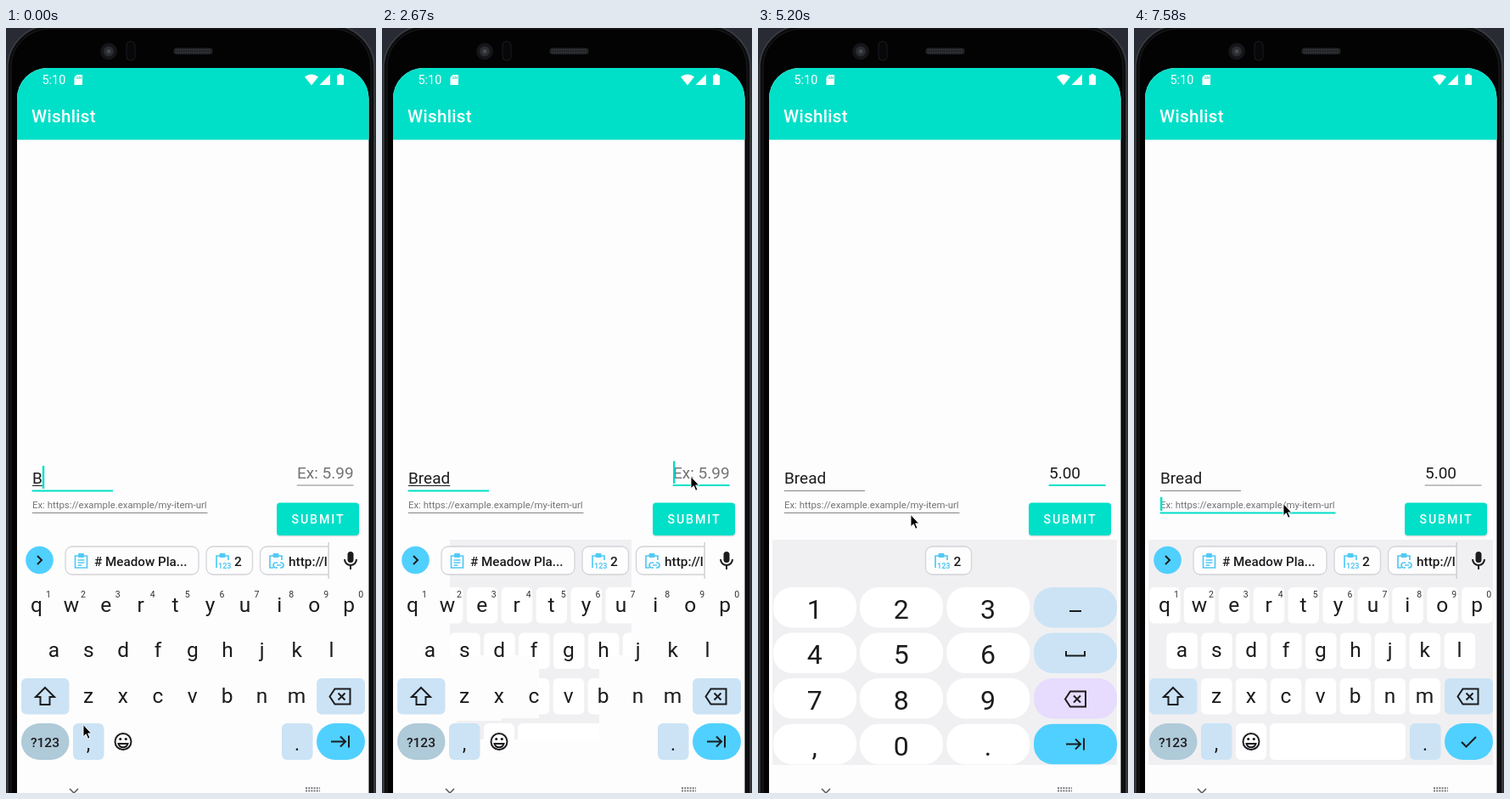
Animation of 436x900 px, one loop 8000 ms. Source, as an HTML page:

```html
<!DOCTYPE html>
<html lang="en">
<head>
<meta charset="utf-8">
<title>Wishlist entry</title>
<style>
  html, body { margin: 0; width: 100%; height: 100%; overflow: hidden; background: #25282f; }
  svg { display: block; width: 436px; height: 900px; }
  text { font-family: Roboto, sans-serif; white-space: pre; }
  .line { fill: none; stroke: #1c1c1f; stroke-width: 2; }
  .blue { fill: none; stroke: #52c9f5; stroke-width: 1.7; }
  .chip { fill: #fdfdfd; stroke: #d3d4d8; stroke-width: 1.3; }
</style>
</head>
<body>
<svg id="stage" viewBox="0 0 436 900"></svg>
<script>
const LOOP = 8000;
const TEAL = '#00dfc8', SKY = '#50d0ff', PALE = '#cbe3f5', INK = '#1c1c1f', PAPER = '#fdfdfd';

const rect = (x, y, w, h, fill, r = 0, extra = '') =>
  `<rect x="${x}" y="${y}" width="${w}" height="${h}" rx="${r}" fill="${fill}" ${extra}/>`;
const path = (d, cls = 'line', extra = '') => `<path d="${d}" class="${cls}" ${extra}/>`;
const text = (x, y, str, size, fill = INK, extra = '') =>
  `<text x="${x}" y="${y}" font-size="${size}" fill="${fill}" ${extra}>${str}</text>`;
const mid = (x, y, str, size, fill = INK, extra = '') =>
  text(x, y, str, size, fill, `text-anchor="middle" ${extra}`);
const at = (x, y, body, extra = '') => `<g transform="translate(${x} ${y})" ${extra}>${body}</g>`;
const group = (id, body) => `<g id="${id}">${body}</g>`;

// Icons are drawn around their own centre.
const tabIcon = path('M-11 0H5M0-6L6 0L0 6M10-7V7');
const eraseIcon = path('M-12 0L-6-9H12V9H-6Z') + path('M-2-4L6 4M6-4L-2 4');
const clipIcon = path('M-3-6H-7V8H7V-6H3', 'blue') + rect(-3.5, -9, 7, 5, '#52c9f5', 1);
const listIcon = clipIcon + path('M-4-1H4M-4 2H4M-4 5H1', 'blue');
const digitsIcon = path('M-3-6H-7V8M3-6H7V-1', 'blue') + rect(-3.5, -9, 7, 5, '#52c9f5', 1) +
  text(-5, 9, '123', 9, '#52c9f5', 'font-weight="700"');
const linkIcon = path('M-3-6H-7V8H-3M3-6H7V-1', 'blue') + rect(-3.5, -9, 7, 5, '#52c9f5', 1) +
  path('M2 2H0A3 3 0 0 0 0 8H2M5 2H6A3 3 0 0 1 6 8H5M1 5H6', 'blue');

// Keyboard layout
const PITCH = 40.9;
const rows = [
  { keys: 'qwertyuiop', x: 36, y: 658, base: 687 },
  { keys: 'asdfghjkl', x: 56.4, y: 711.5, base: 740 },
  { keys: 'zxcvbnm', x: 97, y: 765, base: 794 },
];
const eachKey = draw => rows.map(row =>
  [...row.keys].map((key, i) => draw(key, row.x + i * PITCH, row, i)).join('')).join('');

const relief = rect(17, 602, 406, 265, '#f0f0f2') +
  eachKey((key, x, row) => rect(x - 18, row.y, 36.5, 42.5, '#fff', 6)) +
  rect(120, 818, 36, 43, '#fff', 6) + rect(160, 818, 160, 43, '#fff', 6);

const suggestions =
  `<circle cx="39.5" cy="626" r="16.3" fill="${SKY}"/>` + path('M37 621L42 626L37 631') +
  rect(70, 610, 157, 33, PAPER, 8, 'class="chip"') + at(88.5, 627, listIcon) +
  text(104, 633, '# Meadow Pla...', 15.2, INK, 'font-weight="500"') +
  rect(236, 610, 54.5, 33, PAPER, 8, 'class="chip"') + at(255, 627, digitsIcon) +
  text(269, 633, '2', 15.5, INK, 'font-weight="500"') +
  `<g clip-path="url(#strip)">` + rect(299.5, 610, 110, 33, PAPER, 8, 'class="chip"') +
  at(318, 627, linkIcon) + text(333, 633, 'http://l', 15.4, INK, 'font-weight="500"') + '</g>' +
  rect(379.5, 605, 1.2, 43, '#c4c5c8') +
  rect(402.5, 616, 7, 13, INK, 3.5) + path('M399 625A7 7 0 0 0 413 625M406 632V637');

const letters = eachKey((key, x, row, i) => mid(x, row.base, key, 24.5) +
    (row === rows[0] ? mid(x + 14, 670, (i + 1) % 10, 10.5, '#333') : '')) +
  rect(18, 765, 56.5, 42.5, PALE, 6) + rect(366, 765, 57, 42.5, PALE, 6) +
  path('M46 776L57 787H51.5V796H40.5V787H35Z') + at(393.5, 786.5, eraseIcon) +
  rect(18, 818, 56.5, 43, '#afcad8', 21.5) + mid(46, 846, '?123', 15.5, INK, 'font-weight="500"') +
  rect(79, 818, 36.5, 43, PALE, 6) + mid(97, 850, ',', 23) +
  rect(325, 818, 36.5, 43, PALE, 6) + mid(343, 850, '.', 23) +
  '<circle cx="138" cy="839.5" r="9.5" class="line"/>' + path('M132.5 842A5.7 5.7 0 0 0 143.5 842Z') +
  `<circle cx="134.7" cy="836.5" r="1.6" fill="${INK}"/><circle cx="141.3" cy="836.5" r="1.6" fill="${INK}"/>` +
  rect(366, 818, 57, 43, SKY, 21.5) +
  group('tab', at(394, 839.5, tabIcon)) + group('check', path('M386 840L391.5 845.5L403 834'));

const padColumns = [18, 120, 222.3, 325];
const padRows = [658, 711.5, 765, 818.7];
const padFill = (r, c) => c < 3 ? '#fff' : [PALE, PALE, '#e7dcfd', SKY][r];
const pad = rect(17, 602, 406, 265, '#f0f0f2') +
  rect(197.5, 610, 54, 33, '#fff', 8, 'class="chip"') + at(216, 627, digitsIcon) +
  text(230.5, 633, '2', 15.5, INK, 'font-weight="500"') +
  ['123', '456', '789', ',0.'].map((digits, r) => padColumns.map((x, c) =>
    rect(x, padRows[r], 98, 47.5, padFill(r, c), 22) +
    (c < 3 ? mid(x + 48.7, padRows[r] + 36.8, digits[c], 32) : '')).join('')).join('') +
  path('M367 686H381') + path('M363 733V738.5H385V733') +
  at(374, 789.5, eraseIcon) + at(374, 842.5, tabIcon);

// Parts of the key backgrounds uncovered over time: start, left, top, right, bottom
const reveals = [
  [1330, 88, 815, 152, 837],
  [1480, 141, 812, 195, 837],
  [1630, 185, 720, 256, 837],
  [1770, 80, 515, 294, 738],
  [5780, 17, 602, 423, 867],
];

const fields = {
  name: { x: 31, base: 536, size: 19, right: 126, rule: 544.5, top: 515, tall: 27, hint: '' },
  price: { x: 343, base: 530, size: 19, right: 409.5, rule: 538, top: 509.5, tall: 26.5, hint: 'Ex: 5.99' },
  url: { x: 31, base: 564.5, size: 11.4, right: 237.5, rule: 570.5, top: 552, tall: 16,
         hint: 'Ex: https://example.example/my-item-url' },
};
const fieldArt = Object.entries(fields).map(([id, f]) =>
  text(f.x, f.base, '', f.size, INK, `id="${id}"`) +
  `<path id="${id}Rule" d="M${f.x - .3} ${f.rule}H${f.right}"/>`).join('');

const statusBar = text(42.5, 66, '5:10', 14.4, '#fff') +
  path('M83.5 55H90V67H80.5V58Z', '', 'fill="#fff"') + path('M84 57V60M86.3 57V60M88.4 57V60', '', `stroke="${TEAL}"`) +
  path('M352 57.5Q360 51.5 368 57.5L360 67.5Z', '', 'fill="#fff"') +
  path('M382 54.5V67H369.5Z', '', 'fill="#fff"') +
  rect(390, 55.5, 8, 11.5, '#fff', 1) + rect(392.3, 54, 3.4, 2, '#fff');

const shell = rect(0, 0, 436, 900, '#282b34') +
  rect(2, -3, 432, 1000, '#0b0c0e', 50, 'stroke="#3c3e42" stroke-width="1.6"') +
  rect(6, 1, 424, 1000, '#030304', 45, 'stroke="#1b1c1e"') +
  '<circle cx="121" cy="27.5" r="10" fill="#141518"/><circle cx="121" cy="27.5" r="6" fill="#2b2d31"/>' +
  '<circle cx="121" cy="27.5" r="2.5" fill="#45484d"/>' +
  rect(142, 16, 10, 22, '#08080a', 4, 'stroke="#1b1b1e"') +
  rect(197.5, 23.5, 46, 7.5, '#222326', 3.5) +
  path('M200 25.7H241M200 28.7H241', '', 'stroke="#4a4b4f" stroke-dasharray="1.2 1.4"');

const stage = document.getElementById('stage');
stage.innerHTML = `<defs>
    <clipPath id="screen">${rect(13, 47, 414.5, 1000, '#000', 36)}</clipPath>
    <clipPath id="strip">${rect(290, 600, 89.5, 50, '#000')}</clipPath>
    <clipPath id="uncovered">${reveals.map(([, l, t, r, b]) => rect(l, t, r - l, b - t, '#000')).join('')}</clipPath>
  </defs>` + shell +
  '<g clip-path="url(#screen)">' +
    rect(13, 47, 415, 853, PAPER) + rect(13, 47, 415, 84.5, TEAL) + statusBar +
    text(30, 110.5, 'Wishlist', 20.6, '#fff', 'font-weight="500" letter-spacing=".3"') +
    rect(319, 559.5, 97, 39, '#000', 4, 'opacity=".12"') + rect(319, 558.5, 97, 38.5, TEAL, 4) +
    text(336.5, 583.3, 'SUBMIT', 14.2, '#fff', 'font-weight="500" letter-spacing="1.9"') +
    fieldArt + path('', '', `id="spell" stroke="${INK}"`) + rect(0, 0, 2.4, 0, TEAL, 0, 'id="caret"') +
    group('letters', `<g clip-path="url(#uncovered)">${relief}</g>` + suggestions + letters) +
    group('pad', pad) +
    path('M75 895L80 900L85 895', 'line', 'style="stroke:#55565a;stroke-width:1.5"') +
    path('M353 894.3H370M353 897.5H370', '', 'stroke="#77787c" stroke-width="2" stroke-dasharray="2 1.2"') +
  '</g>' +
  group('mouse', path('M0 0V14.2L3.3 11.2L5.7 16.8L8 15.8L5.6 10.4H9.6Z', '',
    'fill="#000" stroke="#fff" stroke-width=".9"'));

const $ = id => document.getElementById(id);
const uncovered = $('uncovered').children;

// Each step changes only what it names.
const steps = [
  [0, { name: 'B', price: '', url: '', caret: 'name', focus: ['name'], spell: true, board: 'letters', mouse: [91, 819.5] }],
  [450, { name: 'Br' }],
  [600, { name: 'Bre' }],
  [750, { name: 'Brea' }],
  [1040, { name: 'Bread' }],
  [1330, { mouse: [141.5, 818.5] }],
  [1480, { mouse: [186, 813] }],
  [1630, { mouse: [247, 721] }],
  [1770, { mouse: [285, 583], caret: '' }],
  [1920, { mouse: [322, 556] }],
  [2070, { mouse: [352, 539] }],
  [2220, { mouse: [359, 531], caret: 'name' }],
  [2520, { mouse: [364, 527.5], caret: 'price', focus: ['name', 'price'] }],
  [2810, { focus: ['price'], spell: false, board: 'pad' }],
  [3260, { caret: '' }],
  [3860, { price: '5', caret: 'price' }],
  [4010, { price: '5.' }],
  [4460, { price: '5.00' }],
  [4910, { caret: '', mouse: [340, 539] }],
  [5060, { mouse: [252, 563] }],
  [5200, { mouse: [180, 572.5] }],
  [5340, { mouse: [177, 564] }],
  [5490, { mouse: [176, 559.5], caret: 'url', focus: ['price', 'url'] }],
  [5780, { focus: ['url'], board: 'letters' }],
  [6230, { caret: '' }],
  [6680, { url: 'ht', caret: 'url' }],
  [7130, { caret: '' }],
  [7580, { url: '', caret: 'url' }],
];
const stateAt = time => Object.assign({}, ...steps.filter(([start]) => start <= time).map(([, change]) => change));

const show = (id, on) => $(id).style.display = on ? '' : 'none';
const set = (el, attrs) => Object.entries(attrs).forEach(([key, value]) => el.setAttribute(key, value));

function render(time) {
  const state = stateAt(time);
  for (const [id, field] of Object.entries(fields)) {
    const value = state[id], focused = state.focus.includes(id);
    $(id).textContent = value || field.hint;
    set($(id), { fill: value ? INK : '#747477' });
    set($(id + 'Rule'), { stroke: focused ? TEAL : '#858588', 'stroke-width': focused ? 2.1 : 1.1 });
  }
  const widthOf = id => state[id] ? $(id).getComputedTextLength() : 0;
  set($('spell'), { d: `M31 538.5H${31 + widthOf('name')}` });
  show('spell', state.spell);
  show('caret', state.caret);
  if (state.caret) {
    const field = fields[state.caret];
    set($('caret'), { x: field.x + widthOf(state.caret), y: field.top, height: field.tall });
  }
  show('letters', state.board === 'letters');
  show('pad', state.board === 'pad');
  show('tab', time < 5780);
  show('check', time >= 5780);
  reveals.forEach(([start], i) => uncovered[i].style.display = time >= start ? '' : 'none');
  set($('mouse'), { transform: `translate(${state.mouse})` });
}

const begin = performance.now();
function tick() {
  render((performance.now() - begin) % LOOP);
  requestAnimationFrame(tick);
}
tick();
</script>
</body>
</html>
```
